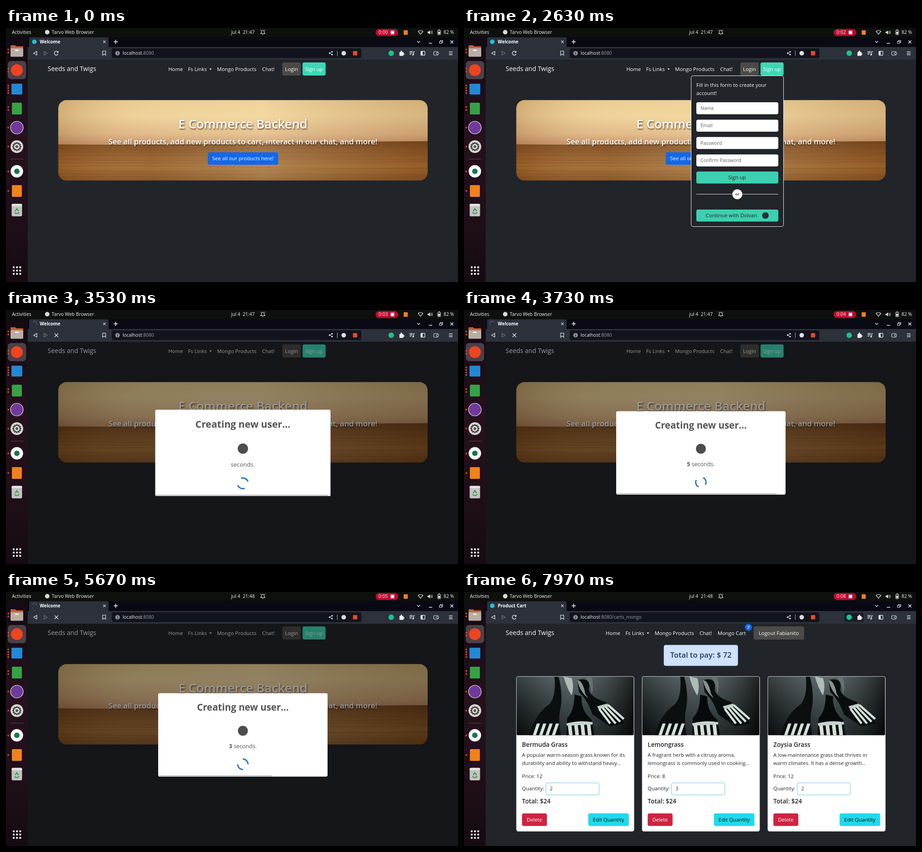
An HTML page for the animation above (8 s loop, 998 by 561 pixels).

```html
<!DOCTYPE html>
<html lang="en">
<head>
<meta charset="utf-8">
<title>Shop demo</title>
<style>
html, body { margin: 0; width: 100%; height: 100%; overflow: hidden; background: #212529; }
svg { display: block; width: 998px; height: 561px; font-family: 'Open Sans', 'Noto Sans', sans-serif; }
text { white-space: pre; }
.shadow { filter: drop-shadow(1.5px 2px 1.5px rgba(40, 20, 0, .75)); }
</style>
</head>
<body>
<svg id="stage" viewBox="0 0 998 561" xmlns="http://www.w3.org/2000/svg"></svg>
<script>
const LOOP = 8000, TEAL = [63, 214, 181], HOVER = [56, 128, 111];
const stage = document.getElementById('stage');

// Markup helpers
const attrs = o => Object.entries(o).map(([k, v]) => ` ${k}="${v}"`).join('');
const rect = (x, y, w, h, fill, r = 0, o = {}) =>
  `<rect x="${x}" y="${y}" width="${w}" height="${h}" rx="${r}" fill="${fill}"${attrs(o)}/>`;
const disc = (x, y, r, fill, o = {}) => `<circle cx="${x}" cy="${y}" r="${r}" fill="${fill}"${attrs(o)}/>`;
const line = (d, stroke, w = 1.3, o = {}) =>
  `<path d="${d}" fill="none" stroke="${stroke}" stroke-width="${w}"${attrs(o)}/>`;
const shape = (d, fill, o = {}) => `<path d="${d}" fill="${fill}"${attrs(o)}/>`;
const text = (x, y, s, size = 11.35, fill = '#fff', o = {}) =>
  `<text x="${x}" y="${y}" font-size="${size}" fill="${fill}"${attrs(o)}>${s}</text>`;
const group = (id, body, o = {}) => `<g id="${id}"${attrs(o)}>${body}</g>`;
const MID = { 'text-anchor': 'middle' }, SEMI = { 'font-weight': 600 }, BOLD = { 'font-weight': 700 };
const stops = list => list.map(([p, c]) => `<stop offset="${p}" stop-color="${c}"/>`).join('');
const fade = (id, list, flat) =>
  `<linearGradient id="${id}" x2="${flat ? 1 : 0}" y2="${flat ? 0 : 1}">${stops(list)}</linearGradient>`;

function defs() {
  return `<defs>
    ${fade('dockBg', [[0, '#130b13'], [.4, '#26111c'], [.75, '#1f0e18'], [1, '#150b12']])}
    ${fade('sky', [[0, '#e9cb8c'], [.35, '#efd29a'], [.75, '#dfb785'], [1, '#c2906a']])}
    ${fade('sand', [[0, '#6f411a'], [.3, '#8a5525'], [.65, '#9d672f'], [1, '#7f4b1e']])}
    ${fade('sides', [[0, 'rgba(130,70,20,.25)'], [.25, 'rgba(255,230,180,.08)'], [.55, 'rgba(255,235,190,.25)'], [1, 'rgba(120,65,20,.2)']], true)}
    ${fade('steel', [[0, '#566063'], [.5, '#2c3437'], [1, '#0c1011']])}
    ${fade('steelSide', [[0, 'rgba(0,0,0,.35)'], [.45, 'rgba(120,135,135,.25)'], [1, 'rgba(0,0,0,.65)']], true)}
    <clipPath id="heroClip">${rect(115.5, 159.3, 815.5, 177.5, '#000', 18)}</clipPath>
    <clipPath id="modalClip">${rect(336, 223.5, 374, 184.3, '#000', 3.6)}</clipPath>
    <clipPath id="photoClip">${rect(0, 0, 259, 130, '#000', 3)}</clipPath>
    <g id="forks" clip-path="url(#photoClip)">${forks()}</g>
  </defs>`;
}

function forks() {
  const tines = (x, y, dx, step, w, h, n) => {
    let d = '';
    for (let i = 0; i < n; i++) {
      const a = x + i * step;
      d += `M${a} ${y}l${w} 0l${dx} ${h}l${-w} 0z`;
    }
    return shape(d, '#d3e0da');
  };
  return rect(0, 0, 259, 130, 'url(#steel)') + rect(0, 0, 259, 130, 'url(#steelSide)') +
    shape('M93 0Q104 45 96 76Q92 98 98 130L28 130Q40 84 72 62Q88 45 84 0z', '#0b0f10') +
    shape('M128 40L144 44Q142 76 166 96L172 130L110 130L112 92Q128 76 128 40z', '#070a0b') +
    shape('M134 8Q166 0 160 30Q164 46 196 56L240 104L206 110L168 84Q158 54 138 34z', '#0a0e0f') +
    shape('M104 0Q112 28 122 42Q128 22 122 4z', '#aebcb8') +
    shape('M134 8Q146 8 152 38L158 48Q140 34 134 8z', '#87948f') +
    shape('M152 2Q164 14 166 40Q172 24 166 2z', '#667270') +
    tines(45, 104, -9, 14, 7, 26, 4) + tines(113, 103, 3, 14, 8, 27, 4) +
    shape('M110 104Q138 96 168 101L168 106L112 109z', '#c5d2cd') +
    shape('M178 66L200 60L205 65L182 73z', '#bccac5') +
    line('M183 72L207 104M190 69L219 104M196 66L229 100M202 63L237 94', '#d3e0da', 5);
}

function dock() {
  const dots = (...ys) => ys.map(y => disc(5, y, 1.9, '#e2431f')).join('');
  let teeth = '', apps = '';
  for (let i = 0; i < 12; i++)
    teeth += rect(22.7, 252, 2.6, 4, '#444', 0, { transform: `rotate(${i * 30} 24 262)` });
  for (let i = 0; i < 9; i++)
    apps += rect(15 + i % 3 * 7.2, 526.5 + Math.floor(i / 3) * 7.2, 4, 4, '#f4f2f3', 1);
  return rect(0, 20, 48, 541, 'url(#dockBg)') + rect(4, 73, 40.5, 40, '#4b4149', 7) +
    dots(47.5, 54, 90, 96.5, 127, 132.5, 138, 143.5, 174.5, 181, 220, 262, 317, 360) +
    shape('M10 40q0-2 2-2h8l3 3h13q2 0 2 2v18q0 2-2 2H12q-2 0-2-2z', '#7d736c') +
    rect(10, 44, 28, 19.5, '#b9aea4', 2) + rect(10, 40.5, 28, 4, '#e0532b', 1) + rect(20, 48, 8, 2.5, '#fff', 1) +
    disc(24, 93, 13, '#f0441f') + rect(12, 123, 24, 24, '#2288d4', 2) + rect(13, 165, 22, 26, '#35a345', 2) +
    disc(24, 220, 14, '#703a9c', { stroke: '#eee', 'stroke-width': 1.2 }) +
    disc(24, 262, 14, '#d9d8d6') + teeth + disc(24, 262, 7.5, 'none', { stroke: '#444', 'stroke-width': 2.2 }) + disc(24, 262, 3, '#555') +
    rect(10, 289, 29, 1, '#5c4a54') + disc(24, 316.5, 13.7, '#fff') + disc(24, 316.5, 6, '#13794b') +
    rect(13, 347, 22, 26, '#f0821a', 2) +
    rect(12.5, 388.5, 23, 27.5, '#c3c3c1', 3) + rect(12.5, 388.5, 23, 5, '#e6e6e4', 2) +
    line('M20.3 404.5L24 399L27.7 404.5M29 407L26.5 409.5H21.5L19 407', '#2f9a43', 2.2) + apps;
}

function topBar() {
  const t = (x, s, o) => text(x, 13.4, s, 10.4, '#f2f2f2', o);
  return rect(0, 0, 998, 20, '#0e100e') + t(13, 'Activities') + disc(91, 9.3, 5, '#d9d9d9') + t(101, 'Tarvo Web Browser') +
    t(497, '', { id: 'clock' }) +
    line('M562.5 12.5H571.5Q570 11 570 8Q570 5 567 5Q564 5 564 8Q564 11 562.5 12.5zM566 14.5H568M563 4L561.8 5.5M571 4L572.2 5.5', '#eee', 1.1) +
    rect(816, 2.3, 50, 15.5, '#bd0a31', 7.7) + t(822.5, '', { id: 'timer' }) + rect(849.5, 6, 7.6, 7.6, '#fff') +
    rect(878, 5, 9, 10, '#f0821a', 1) +
    line('M910 7.5Q915 3.5 920.5 7.5L915.2 13.8z', '#eee', 1.2) +
    shape('M931 8h2.3l3-2.8v9l-3-2.8H931z', '#eee') + line('M938 7.3q1.7 2.4 0 4.8M940 5.8q2.8 4 0 7.8', '#ccc', 1.1) +
    rect(953.2, 5, 6.4, 9.8, 'none', 1, { stroke: '#eee' }) + rect(955, 3.5, 3, 1.5, '#eee') + rect(954.5, 8, 3.8, 5.5, '#eee') +
    t(966, '82 %');
}

function browser() {
  const ink = '#dfe1e6';
  return rect(48, 20, 950, 23, '#080912') + rect(51, 20.5, 175.5, 24, '#2c313c', 3) + rect(48, 42, 950, 28, '#2c313c') +
    disc(62.5, 30.5, 5, '#27c0d8', { id: 'favicon' }) +
    group('tabSpin', line('M57.5 29.5A5 5 0 0 0 66 34.5', '#596071', 1.3)) +
    text(74.5, 34.2, '', 10, '#fff', { id: 'tabTitle', ...BOLD }) +
    line('M214.7 27.9l5.2 5.2m0-5.2l-5.2 5.2', ink) + line('M242.3 26v9M237.8 30.5h9', '#fff', 1.5) +
    line('M907.8 29l3.2 3.2l3.2-3.2M933.5 33.8h7.5M981.2 27.6l6.4 6.4m0-6.4l-6.4 6.4', ink, 1.5) +
    line('M957.2 29.5h5v4.5h-5zM959.2 29.5v-2h5v4.5h-2', ink, 1.2) +
    line('M68 51.7v8L61 55.7z', ink) + line('M84 51.7v8L91 55.7z', '#6e7380') +
    group('reload', line('M114.6 53A4.4 4.4 0 1 0 115 57.4', ink, 1.5) + shape('M115.8 50.5v4.2h-4.2z', ink)) +
    group('stop', line('M107.2 51.8l8 8m0-8l-8 8', ink, 1.5)) +
    line('M213.3 51.2h6.8v9l-3.4-2.7l-3.4 2.7z', ink, 1.2) +
    rect(233.5, 45, 551, 21.5, '#12141d', 3) + disc(246.3, 55.7, 5, '#8d919b') + rect(245.6, 52.7, 1.4, 1.4, '#12141d') + rect(245.6, 55, 1.4, 3.5, '#12141d') +
    text(257.5, 59.3, '', 10.25, '#f1f2f4', { id: 'url' }) +
    line('M720 52.6L714.5 55.6L720 58.8', ink, 1) + disc(720, 52.6, 1.7, ink) + disc(714.5, 55.6, 1.7, ink) + disc(720, 58.8, 1.7, ink) +
    rect(731, 50, 1, 11.5, '#b4b6bd') + disc(745.7, 55.7, 5, '#dcdde0') + rect(766, 51, 9.5, 9.5, '#e8492a', 1) +
    rect(840, 46, 42, 19.5, '#191c28', 3, { id: 'extBox' }) + disc(850.5, 55.7, 6, '#18c58d') +
    shape('M868.7 53h2.6q-.6-3 1.7-3t1.7 3h2.8v2.8q2.5-.4 2.5 1.5t-2.5 1.5v2.6h-8.8z', '#f0f0f2') +
    line('M891 52h7M891 55h7M891 58h4M900 52v7M900 52.3h2.5', ink, 1.4) + disc(898.8, 59, 1.8, ink) +
    rect(916, 51.5, 9, 8.5, 'none', 1, { stroke: ink, 'stroke-width': 1.3 }) + rect(916, 51.5, 4, 8.5, ink) +
    rect(944.5, 52, 9.5, 8, 'none', 1.5, { stroke: ink, 'stroke-width': 1.2 }) + rect(950, 54.3, 5.5, 3.4, '#2c313c', 1, { stroke: ink }) +
    line('M978 52.3h8M978 55.7h8M978 59h8', ink, 1.3);
}

function nav(items) {
  return text(92, 95.4, 'Seeds and Twigs', 14) +
    items.map(([x, s]) => text(x, 94.8, s)).join('') +
    shape(`M${items[1][0] + 47} 89.5h5.4l-2.7 3z`, '#fff');
}

function home() {
  let ripples = '';
  for (let i = 0; i < 9; i++) {
    const y = 266 + i * 8;
    ripples += `M115 ${y}Q310 ${y + 6 - i % 3 * 5} 520 ${y + 1}T931 ${y - 3 + i % 2 * 5}`;
  }
  return nav([[358.5, 'Home'], [402, 'Fs Links'], [466, 'Mongo Products'], [565.5, 'Chat!']]) +
    rect(610, 76, 41, 29, '#4c4a48', 4) + text(616, 94.8, 'Login') +
    rect(654.7, 76, 51, 29, '#3fd6b5', 4, { id: 'signup' }) + text(660.3, 94.8, 'Sign up') +
    `<g clip-path="url(#heroClip)">` + rect(115, 159, 817, 100, 'url(#sky)') +
    shape('M115 257Q300 259 520 255T932 250V338H115z', 'url(#sand)') +
    line(ripples, '#6d3f17', 2, { opacity: .28 }) + rect(115, 159, 817, 179, 'url(#sides)') + '</g>' +
    text(523, 222, 'E Commerce Backend', 27.4, '#fff', { ...MID, ...SEMI, class: 'shadow' }) +
    text(523, 257, 'See all products, add new products to cart, interact in our chat, and more!', 16.75, '#fff', { ...MID, ...SEMI, class: 'shadow' }) +
    rect(445.5, 274.5, 155.5, 27.5, '#1368ec', 4) + text(523, 292.2, 'See all our products here!', 11.35, '#fff', MID);
}

function form() {
  const button = y => rect(513, y, 181, 26.5, '#3bd0af', 4);
  return rect(501.5, 105.5, 204, 333, '#212529', 4, { stroke: '#f1f1f1' }) +
    text(513, 130, 'Fill in this form to create your') + text(513, 147.6, 'account!') +
    ['Name', 'Email', 'Password', 'Confirm Password'].map((s, i) =>
      rect(513, 164 + i * 38.4, 181, 26.5, '#fff', 4) + text(522, 180.8 + i * 38.4, s, 10.55, '#5b5f63')).join('') +
    button(317) + text(603, 334.4, 'Sign up', 11.35, '#212529', MID) +
    rect(513, 366.5, 181, 1, '#e8e8e8') + disc(603.5, 367.2, 11, '#fff') + text(603.5, 370.2, 'or', 8.8, '#55585b', { ...MID, ...BOLD }) +
    button(401) + text(533.5, 418.4, 'Continue with Dolvan', 11.35, '#212529') + disc(665.5, 414.2, 7.3, '#22303a');
}

function modal() {
  return '<g clip-path="url(#modalClip)">' + rect(336, 223, 374, 186, '#fff') +
    rect(336, 404.5, 374, 3.5, '#c9c9c9', 0, { id: 'bar' }) + '</g>' +
    text(523, 262, 'Creating new user...', 20.5, '#545454', { ...MID, ...BOLD }) + disc(523, 306.5, 11, '#4d4d4d') +
    `<text x="523" y="345.4" font-size="12.5" fill="#545454" text-anchor="middle"><tspan id="count" font-weight="700"></tspan><tspan id="unit"></tspan></text>` +
    group('loader', line('M514.9 372.4A11.5 11.5 0 0 1 531.1 372.4M514.9 388.6A11.5 11.5 0 0 0 531.1 388.6', '#2778c4', 2.9));
}

function card(x, [name, a, b, price, qty]) {
  const ink = '#212529';
  return `<g transform="translate(${x} 0)">` + rect(0, 186.5, 259.5, 342, '#fff', 4) +
    '<use href="#forks" x="0" y="186.5"/>' + rect(0, 186.5, 259.5, 342, 'none', 4, { stroke: '#d4d5d6', 'stroke-width': .9 }) +
    text(12.3, 342, name, 13.6, ink, SEMI) + text(12.3, 364.2, a, 11.3, ink) + text(12.3, 381.9, b, 11.3, ink) +
    text(12.3, 411.2, `Price: ${price}`, 11.3, ink) + text(12.3, 438.2, 'Quantity:', 11.3, ink) +
    rect(65, 421.6, 117.5, 26.6, '#fff', 4, { stroke: '#b5e5ee', 'stroke-width': 2.2 }) + text(74, 438.2, qty, 10.2, ink) +
    text(12.3, 467, 'Total: $24', 13.7, ink, SEMI) +
    rect(12.3, 489, 55, 27.7, '#cf2342', 4) + text(39.8, 507, 'Delete', 11.35, '#fff', MID) +
    rect(158.5, 489, 89.5, 27.7, '#1edaea', 4) + text(203.2, 507, 'Edit Quantity', 11.35, '#0b0d0e', MID) + '</g>';
}

function cart() {
  const goods = [
    ['Bermuda Grass', 'A popular warm-season grass known for its', 'durability and ability to withstand heavy…', 12, 2],
    ['Lemongrass', 'A fragrant herb with a citrusy aroma,', 'lemongrass is commonly used in cooking…', 8, 3],
    ['Zoysia Grass', 'A low-maintenance grass that thrives in', 'warm climates. It has a dense growth…', 12, 2]];
  return nav([[313, 'Home'], [356.5, 'Fs Links'], [421, 'Mongo Products'], [520, 'Chat!'], [560, 'Mongo Cart']]) +
    disc(628, 78, 7.7, '#136cf0') + text(628, 81.2, '7', 8.6, '#fff', { ...MID, ...BOLD }) +
    rect(639.3, 76, 111.7, 29, '#4c4b4a', 4) + text(695, 94.8, 'Logout Fabianito', 11.35, '#fff', MID) +
    rect(441.5, 117.3, 163, 45.5, '#cfe2ff', 4, { stroke: '#b3d1fc' }) +
    text(523, 145.3, 'Total to pay: $ 72', 16.7, '#1b3863', { ...MID, ...SEMI }) +
    goods.map((g, i) => card(115.8 + i * 277.5, g)).join('');
}

stage.innerHTML = defs() + rect(0, 0, 998, 561, '#212529') + group('home', home()) + group('form', form()) +
  group('cart', cart()) + rect(48, 69, 950, 492, '#000', 0, { id: 'dim' }) + group('modal', modal()) +
  browser() + dock() + topBar();
const el = {};
stage.querySelectorAll('[id]').forEach(n => el[n.id] = n);

// Timing
const FORM_AT = 2170, MODAL_AT = 3430, LOAD_AT = 3470, CART_AT = 7530;
const TICKS = [670, 1670, 2670, 3670, 4670, 7330, 7730, 7870];
const BAR = [[3470, 710], [3530, 705], [4300, 650], [4870, 612], [5100, 593], [5270, 592], [5470, 590], [5670, 587],
  [5930, 584], [6000, 582], [6270, 581], [6500, 578], [6730, 574], [7170, 571], [7330, 565], [7500, 532], [7530, 529]];
const clamp = v => Math.max(0, Math.min(1, v));
const mix = (a, b, p) => a + (b - a) * p;

// CSS "ease" curve
function ease(p) {
  let lo = 0, hi = 1;
  for (let i = 0; i < 20; i++) {
    const s = (lo + hi) / 2, x = .75 * s * (1 - s) + s ** 3;
    if (x < p) lo = s; else hi = s;
  }
  const s = (lo + hi) / 2;
  return .3 * s * (1 - s) ** 2 + 3 * s * s * (1 - s) + s ** 3;
}

// The bar glides, but moves in jerks while the page is busy.
function barEnd(t) {
  if (t <= BAR[0][0]) return 710;
  const i = BAR.findIndex(p => p[0] > t);
  if (i < 0) return 529;
  const [t0, x0] = BAR[i - 1], [t1, x1] = BAR[i];
  return t0 >= 5100 && t0 < 7330 ? x0 : mix(x0, x1, (t - t0) / (t1 - t0));
}

function popScale(p) {
  if (p < .45) return mix(.7, 1.05, ease(p / .45));
  if (p < .8) return mix(1.05, .95, ease((p - .45) / .35));
  return mix(.95, 1, ease(clamp((p - .8) / .2)));
}

const show = (node, on) => node.setAttribute('display', on ? 'inline' : 'none');

function draw(t) {
  const inCart = t >= CART_AT, open = t >= MODAL_AT && !inCart, loading = t >= LOAD_AT && !inCart;
  show(el.home, !inCart);
  show(el.cart, inCart);
  show(el.extBox, inCart);
  show(el.form, t >= FORM_AT && t < MODAL_AT);
  show(el.modal, open);
  show(el.stop, loading);
  show(el.reload, !loading);
  show(el.tabSpin, loading);
  show(el.favicon, !loading);

  el.clock.textContent = t < 4000 ? 'jul 4  21:47' : 'jul 4  21:48';
  el.timer.textContent = '0:0' + TICKS.filter(x => x <= t).length;
  el.tabTitle.textContent = inCart ? 'Product Cart' : 'Welcome';
  el.url.innerHTML = `localhost<tspan fill="#9a9da6">:8080${inCart ? '/carts_mongo' : ''}</tspan>`;

  const hover = ease(clamp((t - 1530) / 180)) - ease(clamp((t - 2330) / 180));
  el.signup.setAttribute('fill', `rgb(${TEAL.map((c, i) => Math.round(mix(c, HOVER[i], hover)))})`);
  el.dim.setAttribute('opacity', open ? .4 * clamp((t - MODAL_AT) / 100) : 0);

  const end = barEnd(t), left = 5 * (end - 336) / 374;
  const scale = popScale(clamp((t - MODAL_AT) / 300));
  el.modal.setAttribute('transform', `translate(523 315.6) scale(${scale}) translate(-523 -315.6)`);
  el.bar.setAttribute('width', end - 336);
  const counted = t >= 3560;
  el.count.textContent = counted ? left.toFixed(0) : '';
  el.unit.textContent = counted ? ' seconds.' : 'seconds.';
  el.loader.setAttribute('transform', `rotate(${25 + 240 * (4.935 - left)} 523 380.5)`);
  el.tabSpin.setAttribute('transform', `rotate(${-240 * (4.2 - left)} 62.5 30.5)`);
}

const start = performance.now();
function frame(now) {
  draw(Math.max(0, now - start) % LOOP);
  requestAnimationFrame(frame);
}
draw(0);
requestAnimationFrame(frame);
</script>
</body>
</html>
```
